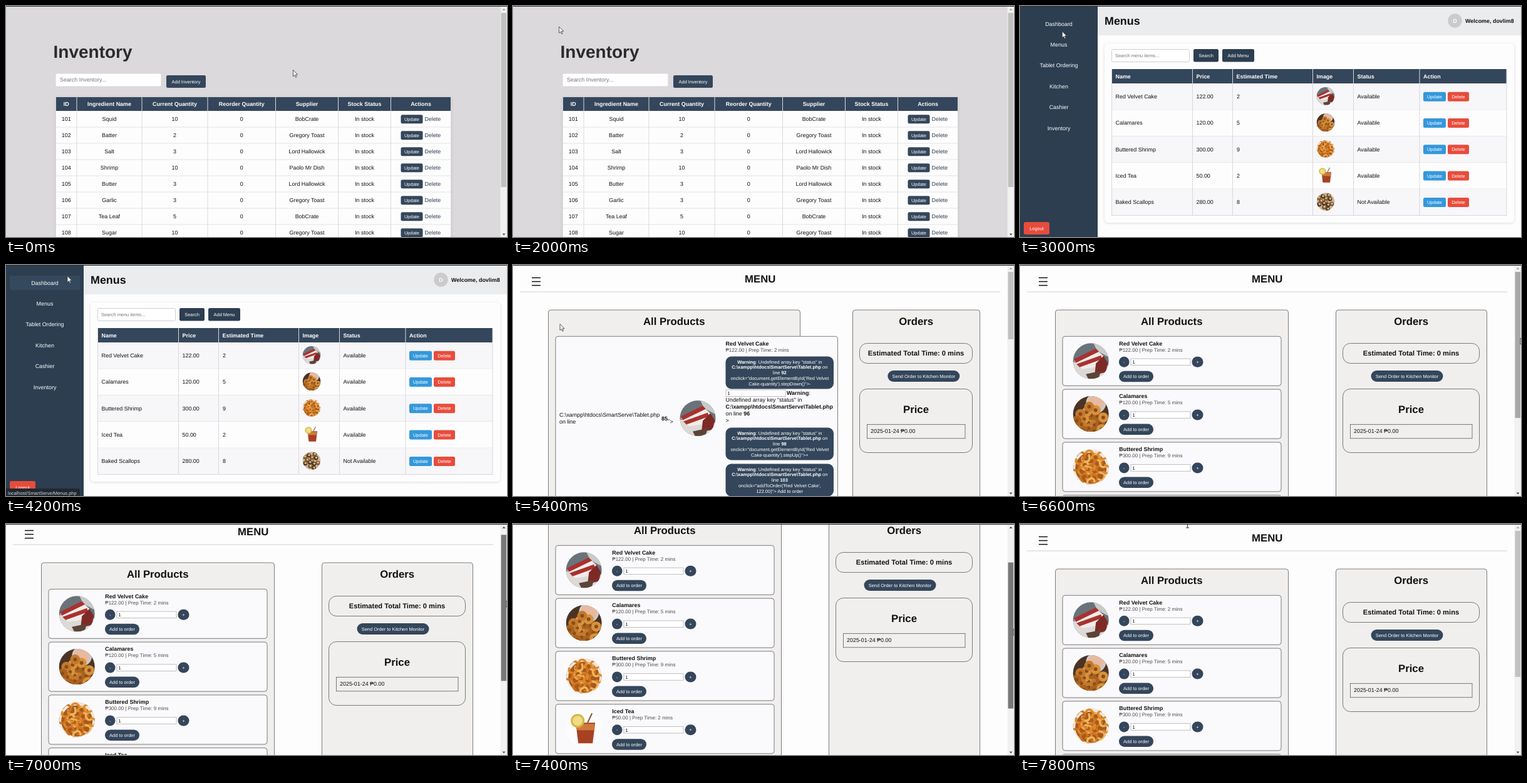
Write an HTML page that moves like this. It is 800x370 px and loops after 8000 ms.

```html
<!DOCTYPE html>
<html lang="en">
<head>
<meta charset="utf-8">
<title>Restaurant admin walkthrough</title>
<style>
  html, body { margin: 0; width: 100%; height: 100%; overflow: hidden; background: #fefdfe; }
  svg { display: block; width: 100%; height: 100%; }
  text { font-family: "Liberation Sans", Arial, sans-serif; fill: #111; text-rendering: geometricPrecision; white-space: pre; }
  .b { font-weight: bold; }
  .m { text-anchor: middle; }
  .w { fill: #fff; }
  .g { fill: #757575; }
  .d { fill: #4c4c50; }
  .title { fill: #2b2b2d; }
  .delete { fill: #2c3e50; }
  .link { fill: #d5d8dc; }
  .thin { stroke-width: .7; }
  .shadow { filter: drop-shadow(0 1px 2px #0002); }
</style>
</head>
<body>
<svg id="stage" viewBox="0 0 800 370"></svg>
<script>
const NAVY = '#34465b', DARK = '#2c3e50', RED = '#e74c3c', BLUE = '#3498db', INK = '#48484c';
const PAPER = '#fefdfe', PANEL = '#f0efed';
const BASE = 8.93, SMALL = 7.44, HEAD = 16.74;

// Markup helpers
const rect = (x, y, w, h, fill, r = 0, stroke = 'none', cls = '') =>
  `<rect x="${x}" y="${y}" width="${w}" height="${h}" rx="${r}" fill="${fill}" stroke="${stroke}" class="${cls}"/>`;
const box = (x, y, w, h, fill, r) => rect(x, y, w, h, fill, r, INK, 'thin');
const text = (x, y, s, size = BASE, cls = '') =>
  `<text x="${x}" y="${y}" font-size="${size}" class="${cls}">${s}</text>`;
const circle = (x, y, r, fill, extra = '') => `<circle cx="${x}" cy="${y}" r="${r}" fill="${fill}" ${extra}/>`;
const path = (d, fill, extra = '') => `<path d="${d}" fill="${fill}" ${extra}/>`;
const bold = s => `<tspan class="b">${s}</tspan>`;
const button = (x, y, w, h, label, fill, r = 2.5) =>
  rect(x, y, w, h, fill, r) + text(x + w / 2, y + h / 2 + 2.6, label, SMALL, 'm w');
const each = (list, fn) => list.map(fn).join('');

// Food pictures, drawn in a disc of radius 28.5
const spiral = (n, fn) => each([...Array(n).keys()], i => {
  const a = i * 2.4, d = 5.6 * Math.sqrt(i);
  return fn(d * Math.cos(a), d * Math.sin(a), i);
});
const backdrop = fill => rect(-29, -29, 58, 58, fill);
const foods = [
  backdrop('#6a737a') + path('M4-29H29V-6L10-16Z', '#c9cbc9') + path('M-29 2L29 8V29H-29Z', '#dcd9d6') +
    path('M-27 0L8-19 20-8 18 8-14 13Z', '#f3ebe7') +
    path('M-27-3L8-20 13-15-24 3Z M-23 5L16-9 18-3-18 10Z', '#a8322f') +
    path('M8 4L20-8 27 3 24 18 6 22Z', '#7d2a26') + path('M-8 21L16 16 12 29H-4Z', '#5d4438'),
  backdrop('#4b3325') + circle(8, -17, 16, '#cfc9c6') + circle(8, -18, 12.5, '#e6b9a0') +
    spiral(18, (x, y, i) => circle(x, y + 10, 5.5, '#8a4c1c',
      `stroke="${['#c47a2c', '#d8923c', '#a9631f'][i % 3]}" stroke-width="5"`)),
  backdrop('#efe6da') + circle(0, 2, 25, '#a85a1c') +
    spiral(22, (x, y, i) => path('M-6 3Q-4-7 3-4T5 5', 'none',
      `stroke="${['#e08a2c', '#efb45c', '#cf7420'][i % 3]}" stroke-width="3.4" stroke-linecap="round"
       transform="translate(${x} ${y}) rotate(${i * 73})"`)),
  backdrop('#fdfdfd') + path('M-13-10H18L14 23H-9Z', '#a84122') +
    path('M-12-8H17L16 2H-11Z', '#cf7a3d') + path('M6-10L13-25', 'none', 'stroke="#7a5230" stroke-width="2"') +
    circle(-10, -13, 11, '#d6b63d') + circle(-10, -13, 8, '#f0dc86'),
  backdrop('#c9b79f') +
    spiral(13, (x, y, i) => circle(x * 1.3, y * 1.3, 7, i % 2 ? '#4c3423' : '#7b532f') +
      circle(x * 1.3 + 1, y * 1.3 - 1, 3.6, '#d9b478'))
];
const food = (kind, x, y, r) =>
  `<g transform="translate(${x} ${y}) scale(${r / 28.5})" clip-path="url(#disc)">${foods[kind]}</g>`;

const dishes = [
  ['Red Velvet Cake', '122.00', 2, 'Available'], ['Calamares', '120.00', 5, 'Available'],
  ['Buttered Shrimp', '300.00', 9, 'Available'], ['Iced Tea', '50.00', 2, 'Available'],
  ['Baked Scallops', '280.00', 8, 'Not Available']
];

function inventoryPage() {
  const cols = [79.5, 113, 217, 322, 430.5, 530.5, 614.5, 710.5];
  const mid = i => (cols[i] + cols[i + 1]) / 2;
  const [bob, greg, lord, paolo] = ['BobCrate', 'Gregory Toast', 'Lord Hallowick', 'Paolo Mr Dish'];
  const stock = [['Squid', 10, bob], ['Batter', 2, greg], ['Salt', 3, lord], ['Shrimp', 10, paolo],
    ['Butter', 3, lord], ['Garlic', 3, greg], ['Tea Leaf', 5, bob], ['Sugar', 10, greg]];
  const titles = ['ID', 'Ingredient Name', 'Current Quantity', 'Reorder Quantity', 'Supplier', 'Stock Status', 'Actions'];
  return rect(0, 0, 800, 370, '#dbd9db') + text(75.5, 83, 'Inventory', 28, 'b title') +
    rect(79, 108, 169, 21, '#fff', 2, '#d5d4d8') + text(86, 121.3, 'Search Inventory...', BASE, 'g') +
    button(256, 111, 63, 20, 'Add Inventory', NAVY) +
    rect(79.5, 146, 631, 240, PAPER, 0, 'none', 'shadow') + rect(79.5, 146, 631, 22, NAVY) +
    each(titles, (s, i) => text(mid(i), 160, s, BASE, 'b m w')) +
    each(stock, ([name, count, supplier], i) => {
      const y = 168 + 26 * i;
      return rect(79.5, y + 25.5, 631, 1, '#e3e2e6') +
        each([101 + i, name, count, 0, supplier, 'In stock'], (s, c) => text(mid(c), y + 16.2, s, BASE, 'm')) +
        button(630.5, y + 6.3, 35, 14, 'Update', NAVY) + text(668.5, y + 15.8, 'Delete', BASE, 'delete');
    }) +
    each(cols, x => rect(x - .5, 146, 1, 224, '#d9d9de'));
}

const navItems = ['Dashboard', 'Menus', 'Tablet Ordering', 'Kitchen', 'Cashier', 'Inventory'];
const navTop = i => 17 + 33.4 * i;

function menusPage() {
  const cols = [146.5, 275.5, 339.5, 467.5, 532.5, 638, 777];
  const titles = ['Name', 'Price', 'Estimated Time', 'Image', 'Status', 'Action'];
  return rect(0, 0, 800, 370, PAPER) + rect(124, 0, 676, 47, '#eaecee') + rect(0, 0, 124, 370, DARK) +
    '<rect id="hover" x="6" width="112" height="23" rx="2" fill="#34495e"/>' +
    each(navItems, (s, i) => text(62, navTop(i) + 14.6, s, BASE, 'm w')) +
    button(6, 346, 41, 20, 'Logout', RED, 3) +
    text(135, 29.5, 'Menus', 17.9, 'b') + circle(694.5, 23.5, 11.2, '#cbcbcd') +
    text(694.5, 27, 'D', BASE, 'b m w') + text(711, 26.7, 'Welcome, dovlim8', BASE, 'b') +
    rect(135, 60, 654, 287, PAPER, 5, 'none', 'shadow') +
    rect(146.5, 69.5, 124, 20, '#fff', 2, '#cfcfd3') + text(152, 82, 'Search menu items...', SMALL, 'g') +
    button(277, 69, 40, 20.5, 'Search', DARK) + button(323, 69, 51, 20.5, 'Add Menu', DARK) +
    rect(146, 101, 631, 23, NAVY) +
    each(titles, (s, i) => text(cols[i] + 6, 115.6, s, BASE, 'b w')) +
    each(dishes, ([name, price, time, status], i) => {
      const y = 124 + 42.3 * i, base = y + 24;
      return rect(146, y, 631, 42.3, i % 2 ? PAPER : '#f7f6f8') + rect(146, y + 41.8, 631, 1, '#d8d8da') +
        text(152.5, base, name) + text(281.5, base, price) + text(346, base, time) + text(538.5, base, status) +
        food(i, 488, y + 20.3, 14.3) +
        button(644, y + 13.7, 36, 15, 'Update', BLUE) + button(683, y + 13.7, 34, 15, 'Delete', RED);
    }) +
    each(cols, x => rect(x - .5, 101, 1, 235, '#d8d8da')) +
    '<g id="status">' + rect(-4, 358, 122, 16, '#20272f', 3) + text(3, 367.5, '', SMALL, 'link" id="link') + '</g>';
}

// Tablet page parts
const tabletHeader = () => rect(0, 0, 800, 760, PAPER) +
  each([19.7, 25.8, 31.9], y => rect(30, y, 14, 1.5, '#111')) +
  text(394.7, 27.5, 'MENU', HEAD, 'b m') + rect(11, 42.6, 767, .9, '#c9cace');
const panel = (x, right, title, bottom) => box(x + .5, 72, right - x, bottom - 72, PANEL, 4) +
  text((x + right) / 2 + .2, 96.4, title, HEAD, 'b m');
const label = (x, y, [name, price, time]) => text(x, y, name, BASE, 'b') +
  text(x, y + 10, `₱${price} | Prep Time: ${time} mins`, 8.04, 'd');
const amount = (x, y) => rect(x, y, 95, 10.5, '#fff', 0, '#a5a5aa', 'thin') + text(x + 2.5, y + 8, '1', SMALL);

function orders(x, sendX, bottom) {
  const mid = (x + 745) / 2;
  return panel(x, 745, 'Orders', bottom) +
    box(x + 11.5, 125.5, 722 - x, 32, PANEL, 12) +
    text(mid, 145.2, 'Estimated Total Time: 0 mins', 11.16, 'b m') +
    button(sendX, 169, 115, 18, 'Send Order to Kitchen Monitor', NAVY, 9) +
    box(x + 11.5, 198.5, 722 - x, 102, PANEL, 12) + text(mid, 236.5, 'Price', HEAD, 'b m') +
    box(x + 23.5, 255.3, 698.5 - x, 22.5, PANEL, 0) + text(x + 29, 269, '2025-01-24 ₱0.00');
}

function tabletPage() {
  return tabletHeader() + panel(56, 428, 'All Products', 543) +
    each(dishes, (dish, i) => {
      const y = 114.3 + 84.8 * i;
      return box(68, y, 349, 79, '#faf9fb', 4) + food(i, 113.2, y + 39.5, 28.5) + label(158.3, y + 14.3, dish) +
        button(158, y + 32.5, 16.5, 17, '-', NAVY, 8.3) + amount(177, y + 35.8) +
        button(274.5, y + 32.5, 18, 17, '+', NAVY, 8.5) + button(158, y + 55.5, 55, 17.5, 'Add to order', NAVY, 8.7);
    }) + orders(504, 560.5, 543);
}

function brokenTabletPage() {
  const file = String.raw`C:\xampp\htdocs\SmartServe\Tablet.php`;
  const notice = 'Undefined array key "status" in';
  const warning = (y, line, ...code) => rect(339.5, y, 172.5, 52, NAVY, 9) +
    each([`${bold('Warning')}: ${notice}`, `${bold(file)} on`, `line ${bold(line)}`, ...code],
      (s, i) => text(425.8, y + 11 + 8.75 * i, s, SMALL, 'm w'));
  const byId = `onclick="document.getElementById('Red Velvet`;
  return tabletHeader() + panel(56, 458, 'All Products', 800) + box(68, 114.3, 450.5, 500, '#faf9fb', 4) +
    text(74, 243, file) + text(74, 254, 'on line') + text(237, 248.5, '85', BASE, 'b') +
    text(247, 253, '"') + text(250.5, 254, '&gt;') + food(0, 295, 245.5, 28.5) + label(339.5, 129, dishes[0]) +
    warning(146.5, 92, byId, `Cake-quantity').stepDown()"&gt;-`) +
    amount(340, 200) + text(437, 208, bold('Warning') + ':') +
    each([notice, bold(file), `on line ${bold(96)}`, '&gt;'], (s, i) => text(339.5, 219.2 + 10.8 * i, s)) +
    warning(260.5, 98, byId, `Cake-quantity').stepUp()"&gt;+`) +
    warning(318.5, 103, `onclick="addToOrder('Red Velvet Cake',`, '122.00)"&gt; Add to order') +
    orders(542, 598.3, 800);
}

const pages = { inventory: inventoryPage, menus: menusPage, broken: brokenTabletPage, tablet: tabletPage };
const $ = id => document.getElementById(id);
$('stage').innerHTML = '<clipPath id="disc"><circle r="28.5"/></clipPath>' +
  each(Object.keys(pages), id => `<g id="${id}">${pages[id]()}</g>`) +
  '<g id="bar">' + rect(789.5, 0, 10.5, 370, '#f1f1f1') +
  path('M792.5 7L795 4 797.5 7Z', '#505050', 'id="up"') + path('M792.5 364.5L795 367.5 797.5 364.5Z', '#505050') +
  '<rect id="thumb" x="790.5" width="8.5"/></g>' + rect(0, 0, 800, 1, '#2b2c33') +
  path('M0 0V10.2L2.4 8 4 11.7 5.6 11 4 7.4H7.2Z', '#fff', 'id="arrow" stroke="#333" stroke-width=".8"') +
  path('M-2.5-4H2.5M0-4V3M-2.5 3H2.5', 'none', 'id="beam" stroke="#333"');

// Timeline: [time, ...values]
const pageAt = [[0, 'inventory'], [2800, 'menus'], [5200, 'broken'], [5800, 'tablet']];
const linkAt = [[0, ''], [3200, 'Menus'], [3400, ''], [4000, 'Menus'], [4400, ''], [5000, 'Tablet']];
const thumbColor = [[0, '#c1c1c1'], [6200, '#a8a8a8'], [6800, '#787878'], [7800, '#c1c1c1']];
const thumbHeight = { inventory: 279, broken: 108, tablet: 234 };
const scrollAt = [[6600, 0], [6800, 3], [7000, 10], [7200, 50], [7400, 80], [7600, 20], [7800, 0]];
const cursorAt = [
  [0, 458.5, 102.5], [400, 678, 300], [1000, 22, 1], [1200, 150, 275], [1400, 150, 275], [1800, 95, 90],
  [2000, 73.5, 33], [2400, 62, 2], [2600, 62, 2], [3200, 70, 60], [3600, 200, 130], [4000, 75, 58],
  [4200, 98, 17.5], [4600, 706, 145], [5000, 75, 94.5], [5400, 75, 94.5], [6000, 740, 85], [6200, 799, 96],
  [6600, 799, 117], [6800, 799, 119], [7000, 799, 123], [7200, 799, 149], [7400, 799, 168], [7600, 799, 130], [7800, 267.5, 3]
];
const stepAt = (keys, t) => keys.filter(k => k[0] <= t).pop()[1];
function tween(keys, t) {
  const next = keys.findIndex(k => k[0] > t);
  if (next < 1) return (next ? keys[keys.length - 1] : keys[0]).slice(1);
  const [a, b] = [keys[next - 1], keys[next]], p = (t - a[0]) / (b[0] - a[0]);
  return a.slice(1).map((v, i) => v + (b[i + 1] - v) * p);
}
const show = (id, on) => $(id).setAttribute('display', on ? 'inline' : 'none');
const set = (id, attrs) => Object.entries(attrs).forEach(([k, v]) => $(id).setAttribute(k, v));

function draw(now) {
  const t = Math.floor(now % 8000 / 200) * 200; // screen capture at five pictures a second
  const page = stepAt(pageAt, t), [x, y] = tween(cursorAt, t), [scroll] = tween(scrollAt, t);
  Object.keys(pages).forEach(id => show(id, id === page));
  set('tablet', { transform: `translate(0 ${-scroll})` });

  show('bar', page !== 'menus');
  set('up', { fill: scroll > 0 ? '#505050' : '#a8a8a8' });
  set('thumb', { y: 11 + scroll * .632, height: thumbHeight[page] || 0, fill: stepAt(thumbColor, t) });

  const hovered = navItems.findIndex((_, i) => x < 118 && y >= navTop(i) && y <= navTop(i) + 23);
  show('hover', hovered >= 0);
  set('hover', { y: navTop(Math.max(hovered, 0)) });
  const link = stepAt(linkAt, t);
  show('status', link);
  $('link').textContent = `localhost/SmartServe/${link}.php`;

  const typing = t >= 7800;
  show('arrow', !typing);
  show('beam', typing);
  set(typing ? 'beam' : 'arrow', { transform: `translate(${x} ${y})` });
  requestAnimationFrame(() => draw(performance.now()));
}
draw(0);
</script>
</body>
</html>
```
